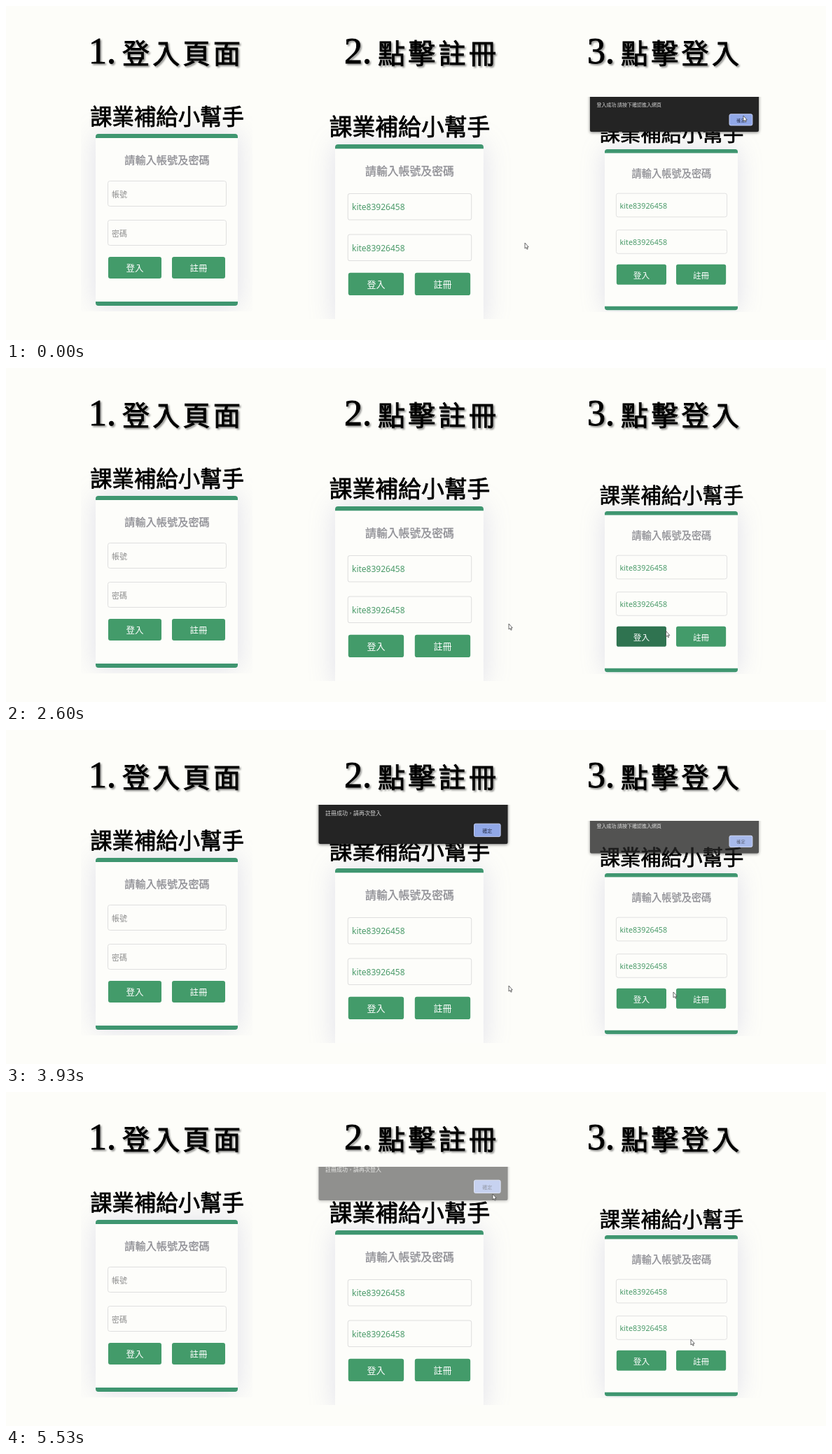
Recreate the animation shown at these times as an HTML page. Size 1171 by 478 pixels, loop 5.59 s.

```html
<!DOCTYPE html>
<html lang="zh-Hant">
<head>
<meta charset="utf-8">
<style>
  html, body { margin: 0; width: 100%; height: 100%; overflow: hidden; background: #fdfdf9; }
  svg { display: block; }
  text { font-family: "Noto Sans CJK TC", "Noto Sans CJK", "Noto Sans CJK JP", sans-serif; dominant-baseline: central; }
  .mid { text-anchor: middle; }
  .head, .num { stroke: #000; stroke-width: .9px; filter: drop-shadow(2px 2px 1px #0006); }
  .head { font-size: 39px; letter-spacing: 4.3px; }
  .num { font-family: "Liberation Serif", serif; font-size: 52px; dominant-baseline: auto; }
  .title { font-size: 31.4px; stroke: #000; stroke-width: .8px; }
  .prompt { font-size: 15.2px; fill: #8d8d93; stroke: #8d8d93; stroke-width: .3px; }
  .hint { font-size: 11px; fill: #8c8c8c; }
  .value { font-family: "Noto Sans", "Open Sans", sans-serif; font-size: 11.5px; fill: #4a9a69; }
  .label { font-size: 12.5px; fill: #fff; }
  .card { fill: #fdfdfa; filter: drop-shadow(0 0 18px #7878b838); }
  .bar { fill: #3f9670; }
  .field { fill: #fdfdfa; stroke: #dfdfdf; }
  .button { fill: #439b6a; }
  .hover { fill: #2f7350; }
  .sheet { fill: #242424; filter: drop-shadow(0 1px 2px #0008); }
  .confirm { fill: #91a8e8; stroke: #c3cdf0; }
</style>
</head>
<body>
<svg id="stage" width="1171" height="478"></svg>
<script>
const LOOP = 5590, STEP = 200 / 3, FADE = 200, MOVE = 300;
const stage = document.getElementById('stage');

const rect = (cls, x, y, w, h, r = 0) =>
  `<rect class="${cls}" x="${x}" y="${y}" width="${w}" height="${h}" rx="${r}"/>`;
const text = (cls, x, y, s, extra = '') => `<text class="${cls}" x="${x}" y="${y}" ${extra}>${s}</text>`;
const pair = (items, make) => items.map(make).join('');

const form = (x, y, scale, cls, values) => `
  <g transform="translate(${x} ${y}) scale(${scale})">
    ${rect('card', 0, 0, 203, 246, 4)}
    <path class="bar" d="M0 6V4Q0 0 4 0H199Q203 0 203 4V6ZM0 240V242Q0 246 4 246H199Q203 246 203 242V240Z"/>
    ${text('title mid', 102, -26.5, '課業補給小幫手')}
    ${text('prompt mid', 102, 36, '請輸入帳號及密碼')}
    ${pair(values, (s, i) => rect('field', 17.5, 67.5 + 56 * i, 169, 36, 3) + text(cls, 23, 86 + 56 * i, s))}
    ${pair(['登入', '註冊'], (s, i) => rect('button', 18 + 91 * i, 176, 76, 31, 3) + text('label mid', 56 + 91 * i, 191.5, s))}
  </g>`;

const dialog = (x, bottom, w, size, message) => `
  <g class="dialog">
    ${rect('sheet', x, bottom - 90, w, 90, 2)}
    ${text('', x + 9.5, bottom - size * 5.6, message, `font-size="${size}" fill="#d4d4d4"`)}
    ${rect('confirm', x + w - size * 6, bottom - size * 3.6, size * 4.7, size * 2.3, 2)}
    ${text('mid', x + w - size * 3.65, bottom - size * 2.4, '確定', `font-size="${size * 0.88}" fill="#2a3350"`)}
  </g>`;

const pointer = `<path class="pointer" d="M0 0V8L1.8 6.5 3 9.2 4.2 8.6 3.1 6H5.3Z"
  fill="#fff" stroke="#444" stroke-width=".8"/>`;

// A nested svg crops its content to the recorded area.
const panel = (id, x, y, w, h, content) =>
  `<svg id="${id}" x="${x}" y="${y}" width="${w}" height="${h}" viewBox="${x} ${y} ${w} ${h}">${content}</svg>`;

const account = Array(2).fill('kite83926458');
stage.innerHTML =
  pair([[118, '登入頁面'], [483, '點擊註冊'], [830, '點擊登入']], ([x, s], i) =>
    text('num', x, 82, i + 1 + '.') + text('head', x + 48, 65, s)) +
  panel('login', 107, 100, 245, 337, form(128, 183, 1, 'hint', ['帳號', '密碼'])) +
  panel('register', 410, 107, 350, 341, form(470, 198, 1.044, 'value', account) +
    dialog(446.5, 163, 270, 8, '註冊成功，請再次登入') + pointer) +
  panel('enter', 805, 130, 290, 308, form(855, 205, 0.936, 'value', account) +
    dialog(834, 180, 241, 7, '登入成功 請按下確認進入網頁') + pointer);

const scenes = [
  { id: 'register', button: 1, period: LOOP, open: 3230, close: 5433, start: [741, 339],
    moves: [[700, 652, 390], [1900, 718, 366], [4500, 699, 152], [5200, 695, 146]] },
  { id: 'enter', button: 0, period: 5050, open: 3777, close: 130, start: [1053, 157],
    moves: [[180, 978, 354], [500, 932, 378], [2450, 953, 375], [4500, 1048, 154]] }
];

for (const scene of scenes) {
  const root = document.getElementById(scene.id);
  scene.target = root.querySelectorAll('.button')[scene.button];
  scene.box = scene.target.getBoundingClientRect();
  scene.dialog = root.querySelector('.dialog');
  scene.pointer = root.querySelector('.pointer');
}

const ramp = (t, duration) => Math.min(1, Math.max(0, t / duration));
const smooth = k => k * k * (3 - 2 * k);

function draw() {
  const now = Math.floor((performance.now() % LOOP + 4) / STEP) * STEP;
  for (const { period, open, close, start, moves, target, box, dialog, pointer } of scenes) {
    const t = now % period;
    let [x, y] = start;
    for (const [at, toX, toY] of moves) {
      const k = smooth(ramp(t - at, MOVE));
      x += (toX - x) * k;
      y += (toY - y) * k;
    }
    const shown = (close < open) + ramp(t - open, FADE) - ramp(t - close, FADE);
    pointer.setAttribute('transform', `translate(${x} ${y})`);
    target.classList.toggle('hover', x >= box.left && x <= box.right && y >= box.top && y <= box.bottom);
    dialog.setAttribute('opacity', shown);
    dialog.setAttribute('transform', `translate(0 ${16 * (shown - 1)})`);
  }
  requestAnimationFrame(draw);
}
draw();
</script>
</body>
</html>
```
